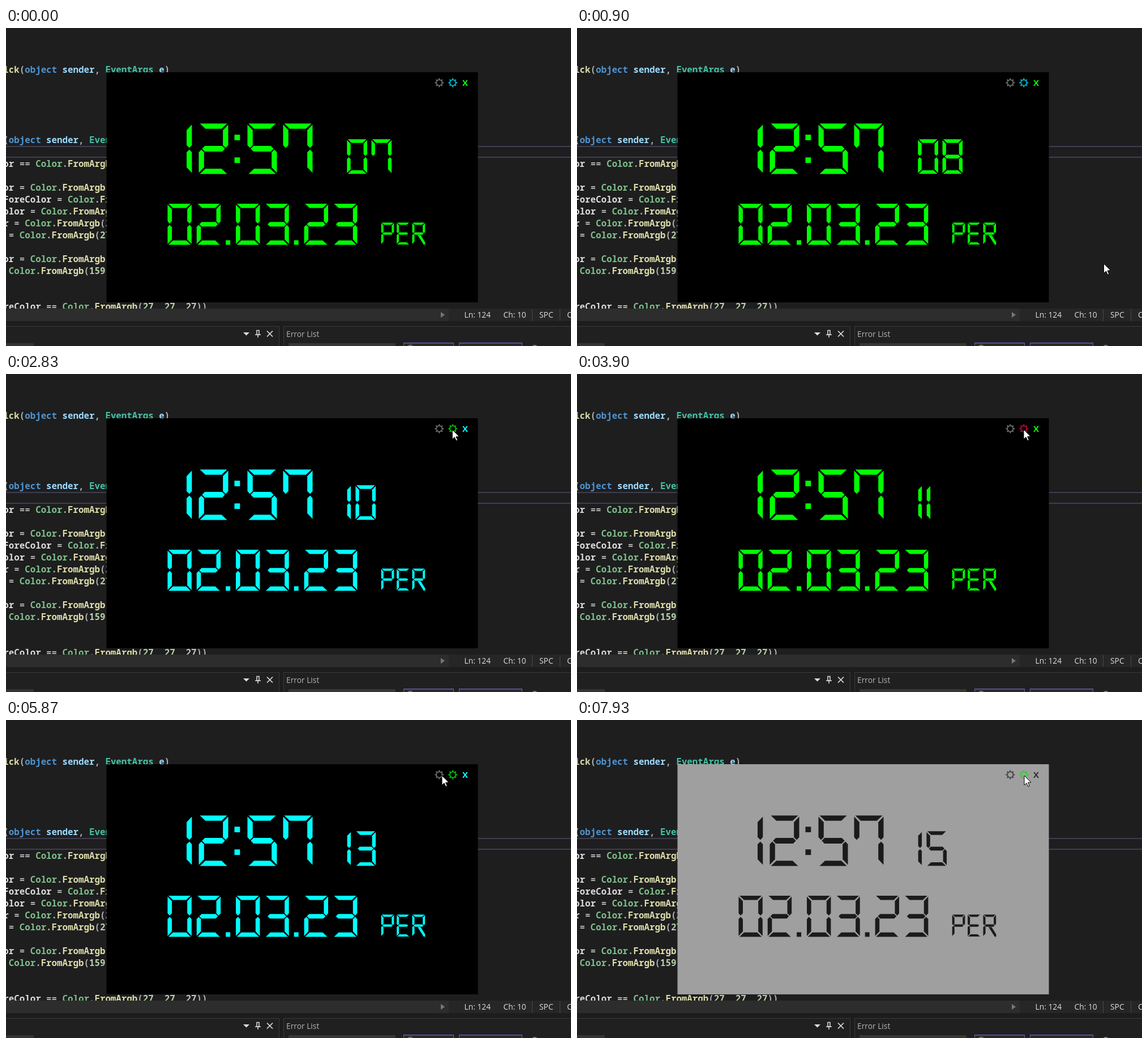
Write an HTML page with a canvas that moves like this. It is 998 px wide and 561 px high and loops after 8 s.

```html
<!DOCTYPE html>
<html lang="en">
<head>
<meta charset="utf-8">
<title>Desktop clock</title>
<style>
html, body { margin: 0; width: 100%; height: 100%; overflow: hidden; background: #1e1e1f; }
canvas { display: block; width: 998px; height: 561px; }
</style>
</head>
<body>
<canvas id="stage" width="998" height="561"></canvas>
<script>
const ctx = document.getElementById('stage').getContext('2d');
const LOOP = 8000;
const MONO = '"Noto Sans Mono", "DejaVu Sans Mono", monospace';
const UI = '"Open Sans", "Noto Sans", sans-serif';

// Code text: the first column lies just outside the left edge
const HEADER = 'Tick(object sender, EventArgs e)';
const CODE = `
 (object sender, EventArgs e)

 or == Color.FromArgb(

 or = Color.FromArgb(
 ForeColor = Color.FromArgb(
 olor = Color.FromArgb(
 r = Color.FromArgb(27
  = Color.FromArgb(27

 or = Color.FromArgb(
  Color.FromArgb(159


oreColor == Color.FromArgb(27, 27, 27))`.split('\n').slice(1);
const WORD_COLORS = {
  object: '#4f94d0', sender: '#9cdcfe', e: '#9cdcfe', EventArgs: '#45c3a6',
  Color: '#7fc08b', FromArgb: '#dcdcaa', Tick: '#dcdcaa'
};
const ADVANCE = 9.48;
const LINE = 21;

// Digit cell, stroke thickness and gap between segments
const W = 53, H = 90, T = 9.8, GAP = 1.4;
const GLYPHS = {
  0: 'abcdef', 1: 'bc', 2: 'abged', 3: 'abgcd', 4: 'fgbc', 5: 'afgcd',
  6: 'afgcde', 7: 'fabc', 8: 'abcdefg', 9: 'abcdfg',
  P: 'abfge', E: 'afged', R: 'abfger', ':': 'ul', '.': 'z'
};
const STEP = { 1: 22, ':': 23, '.': 22 };
const SEGMENTS = makeSegments();

// Each click applies the next ink; the gear previews it
const GREEN = '#00ff00', CYAN = '#00ffff', RED = '#ff0030';
const INKS = [GREEN, CYAN, GREEN, RED, CYAN, GREEN];
const GEAR = { [GREEN]: '#00be08', [CYAN]: '#00b4cd', [RED]: '#b40a34' };
const CLICKS = [2250, 3100, 4300, 5150];
const LIGHT_AT = 6300;
const TICK_AT = 540;

// Pointer glides after entering from the lower right corner
const ENTRY = { x: 1000, y: 566 };
const GLIDES = [
  { at: 560, ms: 900, x: 784, y: 99 },
  { at: 2600, ms: 300, x: 789, y: 98 },
  { at: 5350, ms: 350, x: 770, y: 98 },
  { at: 7050, ms: 400, x: 790, y: 98 }
];

function makeSegments() {
  const flipX = pts => pts.map(([x, y]) => [W - x, y]);
  const flipY = pts => pts.map(([x, y]) => [x, H - y]);
  const square = y => [[0.5, y], [0.5 + T, y], [0.5 + T, y + T], [0.5, y + T]];
  const corner = 1 + GAP, mid = H / 2, half = T / 2;
  const a = [[corner, 0.5], [W - corner, 0.5], [W - T - corner, T], [T + corner, T]];
  const f = [[0.5, corner], [T, T + corner], [T, mid - half - GAP],
    [half, mid - GAP], [0.5, mid - half - GAP]];
  const g = [[half + GAP, mid], [T + GAP, mid - half], [W - T - GAP, mid - half],
    [W - half - GAP, mid], [W - T - GAP, mid + half], [T + GAP, mid + half]];
  const r = [[W * 0.42, mid + half + GAP], [W * 0.65, mid + half + GAP],
    [W, H - T], [W, H], [W - T * 0.6, H]];
  return {
    a, f, g, r, b: flipX(f), c: flipX(flipY(f)), d: flipY(a), e: flipY(f),
    u: square(mid * 0.45), l: square(mid * 1.34), z: square(H - T - 0.5)
  };
}

function rect(x, y, w, h, color) {
  ctx.fillStyle = color;
  ctx.fillRect(x, y, w, h);
}

function poly(points, color) {
  ctx.beginPath();
  for (const [x, y] of points) ctx.lineTo(x, y);
  ctx.closePath();
  ctx.fillStyle = color;
  ctx.fill();
}

function disc(x, y, r, color) {
  ctx.beginPath();
  ctx.arc(x, y, r, 0, 2 * Math.PI);
  ctx.fillStyle = color;
  ctx.fill();
}

function line(x1, y1, x2, y2, width, color) {
  ctx.beginPath();
  ctx.moveTo(x1, y1);
  ctx.lineTo(x2, y2);
  ctx.lineWidth = width;
  ctx.strokeStyle = color;
  ctx.stroke();
}

function label(text, x, y, font, color, align = 'left') {
  ctx.font = font;
  ctx.textAlign = align;
  ctx.fillStyle = color;
  ctx.fillText(text, x, y);
}

function wordColor(word) {
  if (/^\d/.test(word)) return '#b5cea8';
  return WORD_COLORS[word] || (/^\w/.test(word) ? '#dcdcdc' : '#b4b4b4');
}

function drawCodeLine(text, y) {
  let x = -14.2;
  for (const word of text.match(/\w+|\W+/g) || []) {
    label(word, x, y, `600 15.8px ${MONO}`, wordColor(word));
    x += word.length * ADVANCE;
  }
}

function drawEditor() {
  rect(0, 0, 998, 561, '#1e1e1f');
  for (const y of [208, 227]) rect(0, y, 998, 2, '#413d50');
  drawCodeLine(HEADER, 78.5);
  CODE.forEach((text, row) => drawCodeLine(text, 202.5 + row * LINE));
}

function drawStatusBar() {
  rect(0, 495, 782, 22, '#2d2d2e');
  rect(782, 495, 216, 22, '#262627');
  rect(0, 517, 998, 44, '#1d1d1e');
  poly([[768, 501], [775, 506], [768, 511]], '#77777a');
  for (const x of [929, 978]) rect(x, 496, 1, 21, '#48484b');
  const items = { 'Ln: 124': 809.5, 'Ch: 10': 878.5, SPC: 942, CRLF: 991 };
  for (const text in items) label(text, items[text], 511, `13.8px ${UI}`, '#dedede');
}

function drawPanel(x, w) {
  rect(x, 526, w, 35, '#3a3a3c');
  rect(x + 1, 527, w - 2, 34, '#202021');
}

function drawPanels() {
  drawPanel(-1, 484);
  drawPanel(490, 520);
  const icon = '#dcdcdc';
  poly([[419, 537], [430, 537], [424.5, 542.5]], icon);
  ctx.lineWidth = 1.5;
  ctx.strokeStyle = icon;
  ctx.strokeRect(443, 533.5, 4, 7.5);
  line(440, 541, 450, 541, 1.5, icon);
  line(445, 541, 445, 546, 1.5, icon);
  for (const side of [-5, 5]) line(466 - side, 534.5, 466 + side, 544.5, 1.7, icon);
  label('Error List', 495, 545, `13.8px ${UI}`, '#b4b4b4');
  rect(0, 556, 49, 5, '#34352f');
  rect(499, 556, 189, 5, '#373832');
  for (const [x, w] of [[702, 89], [800, 112]]) {
    rect(x, 555, w, 6, '#685db0');
    rect(x + 1, 556.5, w - 2, 5, '#29292c');
  }
  disc(714, 564, 5.5, '#d8414b');
  disc(934, 565, 6, '#3996cf');
}

function drawDigits(text, x, y, scale, color) {
  ctx.save();
  ctx.translate(x, y);
  ctx.scale(scale, scale);
  for (const ch of text) {
    const shift = ch === '1' ? W - T - 1 : 0;
    ctx.translate(-shift, 0);
    for (const seg of GLYPHS[ch]) poly(SEGMENTS[seg], color);
    ctx.translate(shift + (STEP[ch] || 63), 0);
  }
  ctx.restore();
}

function drawGear(x, y, color) {
  ctx.beginPath();
  ctx.arc(x, y, 5.1, 0, 2 * Math.PI);
  ctx.lineWidth = 1.8;
  ctx.strokeStyle = color;
  ctx.stroke();
  for (let i = 0; i < 8; i++) {
    const c = Math.cos(i * Math.PI / 4), s = Math.sin(i * Math.PI / 4);
    line(x + 5.5 * c, y + 5.5 * s, x + 7.9 * c, y + 7.9 * s, 2.2, color);
  }
}

function drawClock(t) {
  const light = t >= LIGHT_AT;
  const clicks = CLICKS.filter(at => t >= at).length;
  const color = light ? '#1b1b1b' : INKS[clicks];
  const seconds = 8 + Math.floor((t - TICK_AT) / 1000);
  rect(177.5, 78, 656, 406, light ? '#9f9f9f' : '#000');
  drawGear(765.3, 96.5, light ? '#454545' : '#6c6c6c');
  drawGear(789.2, 96.5, light ? '#35d035' : GEAR[INKS[clicks + 1]]);
  label('X', 811, 102.3, `bold 15px ${UI}`, light ? '#303030' : color, 'center');
  drawDigits('12:57', 318, 168, 1, color);
  drawDigits(String(seconds).padStart(2, '0'), 602, 196, 0.685, color);
  drawDigits('02.03.23', 285, 309.5, 0.815, color);
  drawDigits('PER', 662.5, 343, 0.435, color);
}

function pointerAt(t) {
  let { x, y } = ENTRY;
  for (const glide of GLIDES) {
    const u = Math.min(1, Math.max(0, (t - glide.at) / glide.ms));
    const eased = u * u * (3 - 2 * u);
    x += (glide.x - x) * eased;
    y += (glide.y - y) * eased;
  }
  return [x, y];
}

function drawPointer(t) {
  ctx.save();
  ctx.translate(...pointerAt(t));
  poly([[0, 0], [0, 17], [4, 13.3], [6.8, 19.5], [9.3, 18.4], [6.6, 12.4], [12, 12]], '#fff');
  ctx.lineWidth = 1;
  ctx.strokeStyle = '#000';
  ctx.stroke();
  ctx.restore();
}

function draw(t) {
  drawEditor();
  drawStatusBar();
  drawPanels();
  drawClock(t);
  drawPointer(t);
}

const start = performance.now();
function frame() {
  draw((performance.now() - start) % LOOP);
  requestAnimationFrame(frame);
}
frame();
</script>
</body>
</html>
```
